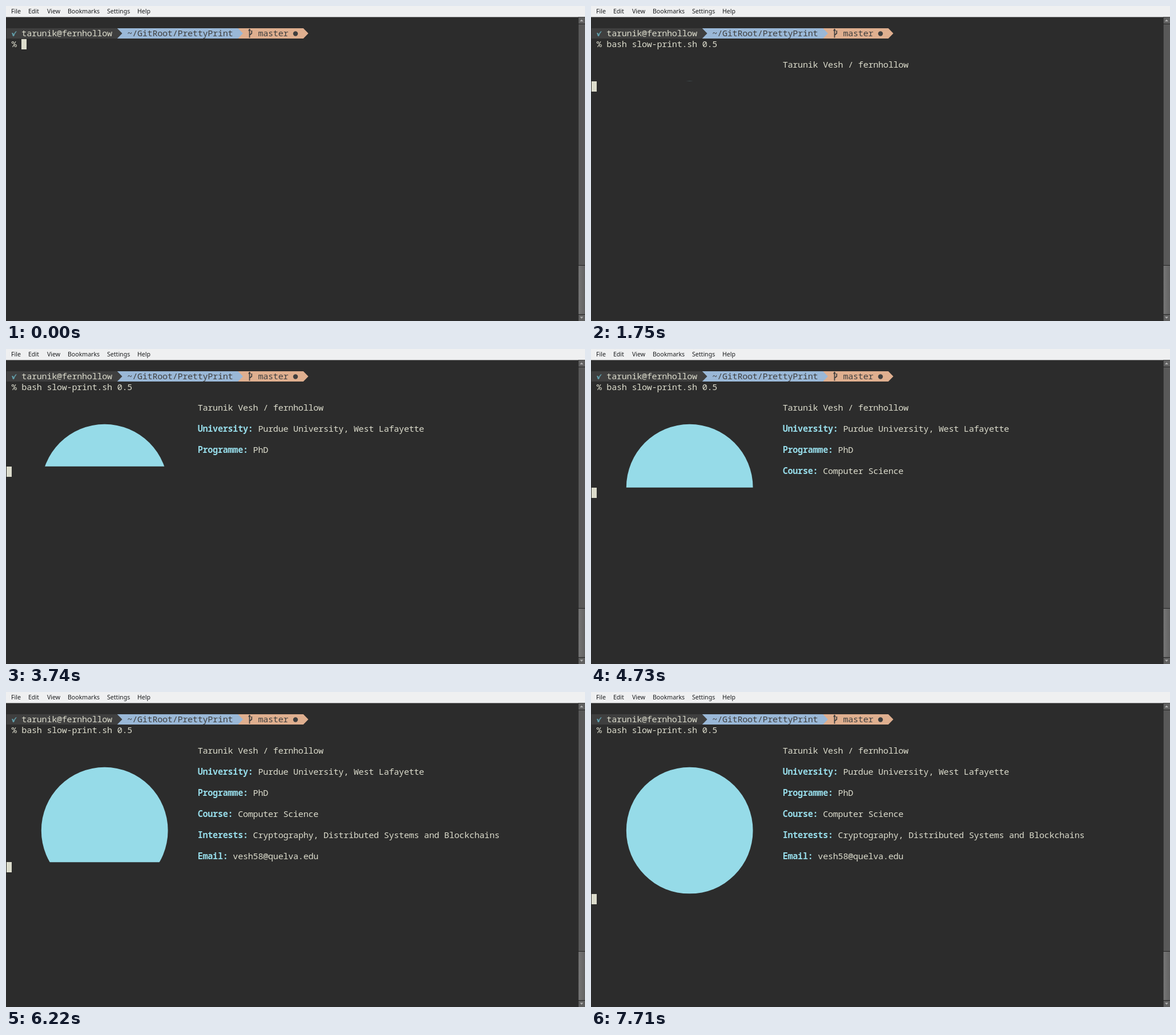
These frames come from a looping animation (1014x552 px, 8000 ms). An HTML page with a canvas:

```html
<!DOCTYPE html>
<html lang="en">
<head>
<meta charset="utf-8">
<title>Slow print</title>
<style>
  html, body { margin: 0; width: 100%; height: 100%; overflow: hidden; background: #2c2c2c; }
  canvas { display: block; }
</style>
</head>
<body>
<canvas id="stage" width="1014" height="552"></canvas>
<script>
const ctx = document.getElementById('stage').getContext('2d');
const LOOP = 8000;
const COL = 8.81, ROW = 18.48, LEFT = 0.9, TOP = 57.9;
const MONO = '15.2px "Noto Sans Mono", monospace';
const FG = '#dcdccc', BG = '#2c2c2c', GREY = '#3f3f3f';
const BLUE = '#9ab8d7', ORANGE = '#dfaf8f', CYAN = '#96dbe8';

const TYPED = 210, ENTER = 720;
// Moments at which each output line is printed
const PRINTS = [770, 1250, 1750, 2250, 2750, 3250, 3740, 4230, 4730,
                5230, 5720, 6220, 6720, 7210, 7710];

const MENU = [['File', 9], ['Edit', 39], ['View', 72], ['Bookmarks', 108],
              ['Settings', 177], ['Help', 230]];

const INFO = [
  { row: 2, label: '', value: 'Tarunik Vesh / fernhollow' },
  { row: 4, label: 'University:', value: 'Purdue University, West Lafayette' },
  { row: 6, label: 'Programme:', value: 'PhD' },
  { row: 8, label: 'Course:', value: 'Computer Science' },
  { row: 10, label: 'Interests:', value: 'Cryptography, Distributed Systems and Blockchains' },
  { row: 12, label: 'Email:', value: 'vesh58@quelva.edu' }
];

const colX = col => LEFT + col * COL;
const rowY = row => TOP + row * ROW;

function rect(x, y, w, h, color) {
  ctx.fillStyle = color;
  ctx.fillRect(x, y, w, h);
}

function poly(color, points) {
  ctx.fillStyle = color;
  ctx.beginPath();
  points.forEach(([x, y]) => ctx.lineTo(x, y));
  ctx.closePath();
  ctx.fill();
}

function disc(x, y, r, color) {
  ctx.fillStyle = color;
  ctx.beginPath();
  ctx.arc(x, y, r, 0, Math.PI * 2);
  ctx.fill();
}

// Spacing that sets the monospaced glyphs on the terminal grid
ctx.font = MONO;
const SPACING = (COL - ctx.measureText('m').width).toFixed(3) + 'px';

function print(text, col, row, color = FG, bold = false) {
  ctx.font = (bold ? 'bold ' : '') + MONO;
  ctx.letterSpacing = SPACING;
  ctx.fillStyle = color;
  ctx.fillText(text, colX(col), rowY(row) + 13.6);
}

function cursor(col, row) {
  rect(Math.round(colX(col)), Math.round(rowY(row)), 9, 18, FG);
}

function menuBar() {
  rect(0, 0, 1014, 19.4, '#eff0f1');
  ctx.font = '10.57px "Noto Sans", sans-serif';
  ctx.letterSpacing = '0px';
  ctx.fillStyle = '#1b1d1f';
  MENU.forEach(([text, x]) => ctx.fillText(text, x, 13));
}

function scrollBar() {
  const x = 1002.6, w = 11.4;
  rect(1002, 19.4, 12, 533, '#242424');
  rect(x, 20, w, 11, '#606060');
  rect(x, 32, w, 422, '#595959');
  const shade = ctx.createLinearGradient(x, 0, x + w, 0);
  shade.addColorStop(0, '#777');
  shade.addColorStop(1, '#626262');
  rect(x, 455, w, 85, shade);
  rect(x, 541, w, 11, '#606060');
  poly('#b0b0b0', [[1005, 27], [1008, 23.5], [1011, 27]]);
  poly('#b0b0b0', [[1005, 544.5], [1008, 548], [1011, 544.5]]);
}

// A prompt segment with a pointed right end
function segment(from, to, color) {
  const y = 39, h = 18, x = colX(to);
  poly(color, [[colX(from), y], [x, y], [x + COL, y + h / 2], [x, y + h], [colX(from), y + h]]);
}

function prompt() {
  segment(46, 59, ORANGE);
  segment(22, 46, BLUE);
  segment(0, 22, GREY);

  poly('#619ca8', [[10, 47], [12.5, 47.2], [13.4, 49.6], [16.5, 44.8], [19, 44.2],
                   [15.8, 48.5], [14, 53], [12, 53]]);
  print('tarunik@fernhollow', 3, -1);
  print('~/GitRoot/PrettyPrint', 24, -1, GREY);

  ctx.strokeStyle = GREY;
  ctx.lineWidth = 1.7;
  ctx.beginPath();
  ctx.moveTo(426.5, 40.5);
  ctx.lineTo(426.5, 55.5);
  ctx.moveTo(426.5, 51);
  ctx.lineTo(430.3, 48);
  ctx.lineTo(430.3, 43);
  ctx.stroke();
  poly(GREY, [[424, 43.5], [426.5, 39.5], [429, 43.5]]);
  print('master', 50, -1, GREY);
  disc(507, 48.5, 4.2, GREY);
  print('%', 1, 0);
}

// The emblem stands on the last line and is uncovered one line at a time
function emblem(lines) {
  const r = 6 * ROW;
  ctx.save();
  ctx.beginPath();
  ctx.rect(0, rowY(1), colX(38), lines * ROW);
  ctx.clip();
  disc(colX(19.5), rowY(PRINTS.length + 1) - r, r, CYAN);
  ctx.restore();
}

function info(lines) {
  INFO.filter(item => item.row <= lines).forEach(({ row, label, value }) => {
    print(label, 38, row, CYAN, true);
    print(value, 38 + (label ? label.length + 1 : 0), row);
  });
}

function draw(t) {
  rect(0, 0, 1014, 552, BG);
  menuBar();
  scrollBar();
  prompt();

  const command = t >= TYPED ? 'bash slow-print.sh 0.5' : '';
  print(command, 3, 0);

  const lines = PRINTS.filter(time => time <= t).length;
  emblem(lines);
  info(lines);
  if (t < ENTER) cursor(3 + command.length, 0);
  else cursor(0, lines + 1);
}

const start = performance.now();
function tick() {
  draw((performance.now() - start) % LOOP);
  requestAnimationFrame(tick);
}
tick();
</script>
</body>
</html>
```
